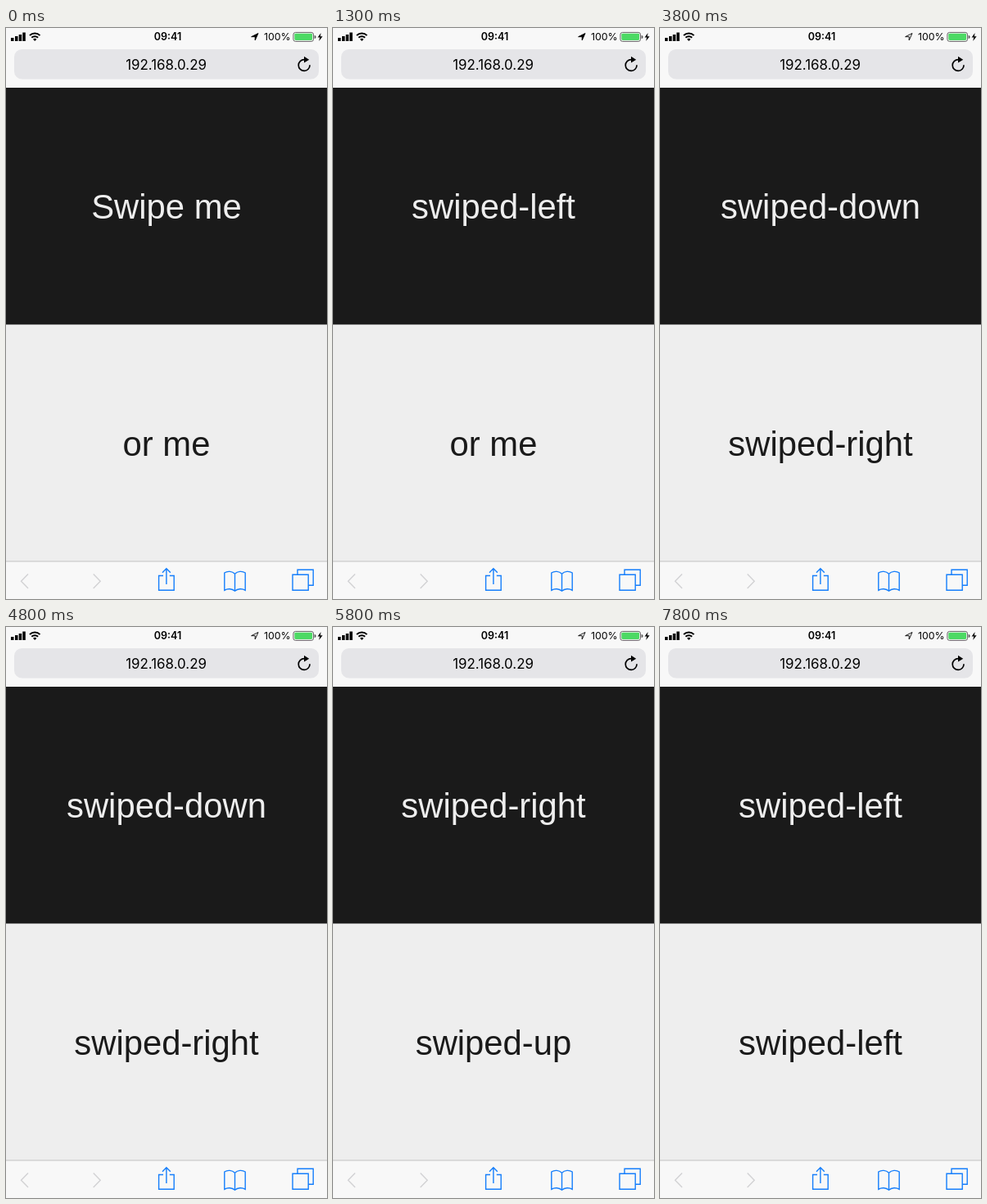
Recreate the animation shown at these times as an HTML page. Size 392x698 px, loop 8000 ms.

```html
<!DOCTYPE html>
<html lang="en">
<head>
<meta charset="utf-8">
<title>Swipe demo</title>
<style>
  html, body { margin: 0; width: 100%; height: 100%; overflow: hidden; background: #f8f8f8; }
  svg { display: block; width: 100vw; height: 100vh; }
  text { text-anchor: middle; font-family: Inter, Roboto, sans-serif; }
  .label { font: 41.8px "Liberation Sans", Arial, sans-serif; }
  .line { fill: none; stroke-width: 1.4; }
</style>
</head>
<body>
<svg viewBox="0 0 392 698">
  <rect width="392" height="698" fill="#f8f8f8"/>

  <!-- status bar -->
  <path d="M6 12h3.5v4H6zM11 10h3.5v6H11zM15.7 8h3.5v8h-3.5zM20.3 5.6h3.5V16h-3.5z"/>
  <g fill="none" stroke="#000" stroke-width="2">
    <path d="M28.9 9.1a9 9 0 0 1 12.6 0M31.3 11.8a5.6 5.6 0 0 1 7.8 0"/>
  </g>
  <path d="M35.2 16l-2.2-2.3a3.2 3.2 0 0 1 4.4 0z"/>
  <text x="197.5" y="15" font-size="12.5" font-weight="600">09:41</text>
  <path id="locator" d="M308 6.5L304.2 15V10.7H299.6Z" stroke="#000" stroke-width=".9" stroke-linejoin="round"/>
  <text x="331.3" y="15" font-size="12.3">100%</text>
  <rect x="350.9" y="5.4" width="24.6" height="11" rx="2.6" fill="none" stroke="#555" stroke-width=".9"/>
  <rect x="352.3" y="6.8" width="21.8" height="8.2" rx="1.4" fill="#4cd964"/>
  <path d="M376.6 9a2 2 0 0 1 0 4z" fill="#555"/>
  <path d="M384.6 6L380.6 11.5H383.2L382.2 16L386.6 10.2H383.8Z"/>

  <!-- address field -->
  <rect x="10" y="26" width="372" height="36.5" rx="9.5" fill="#e5e5e8"/>
  <text x="195.6" y="50.6" font-size="16.9">192.168.0.29</text>
  <path d="M371 45.3A6.9 6.9 0 1 1 364.2 38.6" fill="none" stroke="#000" stroke-width="1.7"/>
  <path d="M364 34.8L370.2 38.7L364 42.6Z"/>

  <!-- swipe areas -->
  <rect y="73" width="392" height="290" fill="#1a1a1a"/>
  <rect y="362.5" width="392" height="289.5" fill="#eee"/>
  <text id="top" class="label" x="196" y="233.4" fill="#eee"></text>
  <text id="bottom" class="label" x="196" y="522.8" fill="#1a1a1a"></text>

  <!-- toolbar -->
  <rect y="651.6" width="392" height=".8" fill="#b4b4b4"/>
  <path class="line" stroke="#d2d2d4" d="M27 667.5L18.5 676.3L27 685M106.7 667.5L115.2 676.3L106.7 685"/>
  <g class="line" stroke="#157efb">
    <path d="M192 669.5H186.6V687.3H205.2V669.5H199.8M195.9 680V661.2M191 665.8L195.9 660.8L200.8 665.8"/>
    <path d="M279.5 667.2C276 663.8 270.5 663.6 266.8 666V687.3C270.5 685 276 685.2 279.5 688.2C283 685.2 288.5 685 292.2 687.3V666C288.5 663.6 283 663.8 279.5 667.2V688"/>
    <path d="M350 668.3H369.2V687.3H350ZM356 668V662.2H375.2V681.3H369.5"/>
  </g>
</svg>
<script>
  const LOOP = 8000;
  const topLabels = [[0, "Swipe me"], [800, "swiped-left"], [3800, "swiped-down"], [5800, "swiped-right"], [6400, "swiped-left"]];
  const bottomLabels = [[0, "or me"], [2100, "swiped-right"], [5000, "swiped-up"], [7200, "swiped-left"]];
  const locatorFills = [[0, "#000"], [2100, "none"]];

  const byId = id => document.getElementById(id);
  const valueAt = (steps, t) => steps.filter(([start]) => start <= t).pop()[1];

  function draw(now) {
    const t = Math.max(0, now) % LOOP;
    byId("top").textContent = valueAt(topLabels, t);
    byId("bottom").textContent = valueAt(bottomLabels, t);
    byId("locator").setAttribute("fill", valueAt(locatorFills, t));
  }

  const begin = performance.now();
  function tick() {
    draw(performance.now() - begin);
    requestAnimationFrame(tick);
  }
  tick();
</script>
</body>
</html>
```
